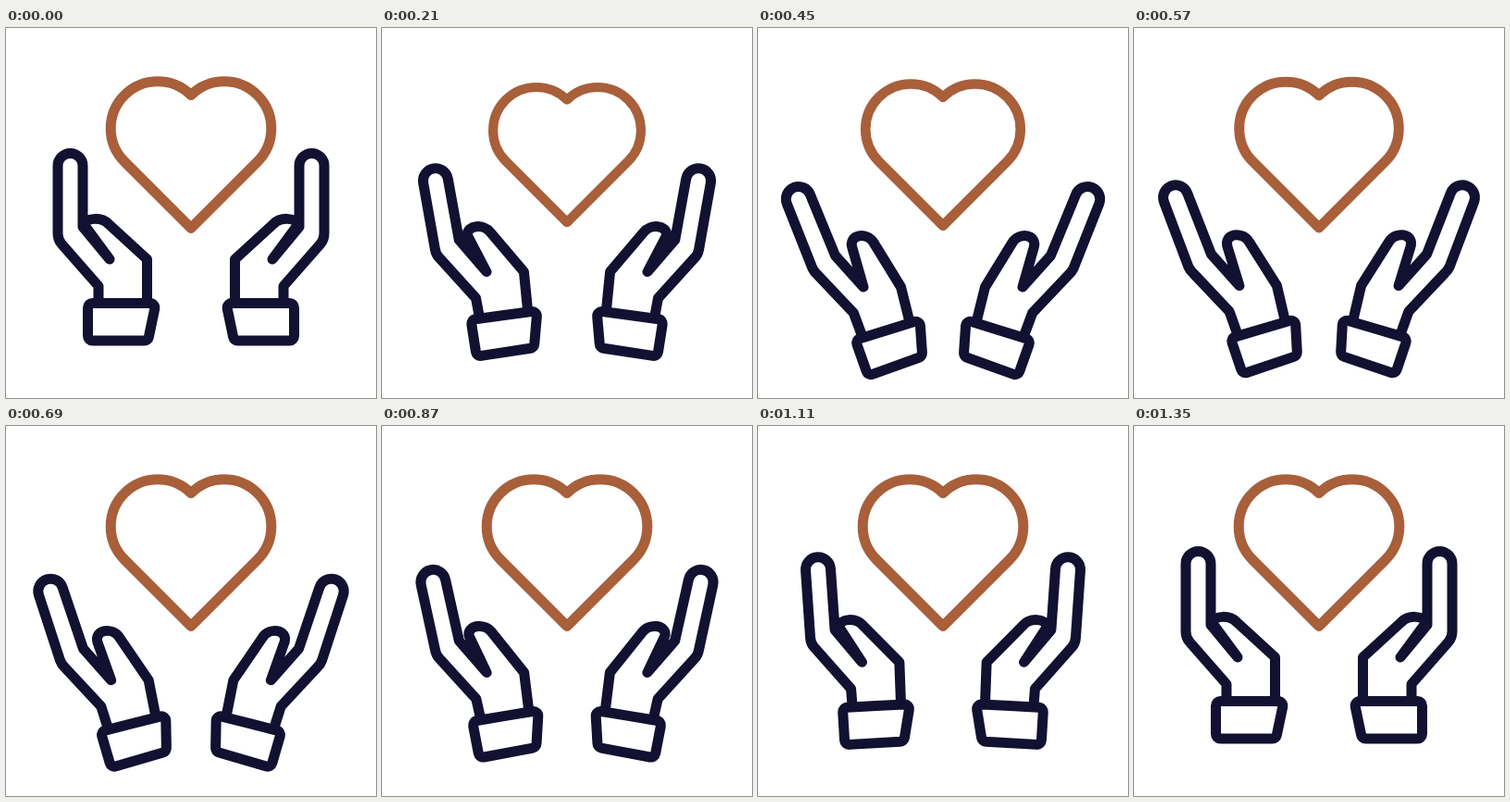
Animation of 400x400 px, one loop 1.91 s. Source, as an HTML page with a canvas:

```html
<!DOCTYPE html>
<html lang="en">
<head>
<meta charset="utf-8">
<title>Caring hands</title>
<style>
  html, body { margin: 0; width: 100%; height: 100%; overflow: hidden; background: #fff; }
  canvas { display: block; }
</style>
</head>
<body>
<canvas id="stage" width="400" height="400"></canvas>
<script>
const ctx = document.getElementById('stage').getContext('2d');
const LOOP = 1910, STEP = 30;
const NAVY = '#121131', COPPER = '#a85f3a';

// Left hand outline: [closed x, closed y, open x, open y]
const HAND = {
  wristLeft: [100, 297, 111.5, 330],
  heel: [100, 279, 103.3, 308],
  bendLow: [60, 233.3, 64, 266.5],
  bend: [56, 229, 61, 264],
  bendHigh: [56, 222, 59, 260],
  fingerLeft: [56, 149, 31, 190],
  fingerRight: [83, 149, 56.6, 180],
  fingerBase: [83, 215, 83.5, 246],
  web: [112, 250, 114, 280],
  thumbStart: [84, 212, 102, 238],
  thumbCurveA: [88, 205, 97, 223],
  thumbCurveB: [103, 204, 118, 220],
  thumbEnd: [111, 212, 125, 232],
  palm: [152.5, 250, 154.5, 280],
  wristRight: [152.5, 297, 164, 318]
};
const CUFF = [
  [88.5, 297.5, 105.2, 337.3],
  [162, 297.5, 175, 315.7],
  [153.5, 338, 177.7, 355],
  [88.5, 338, 119, 376]
];

const ease = (t, from, to) => {
  const u = Math.min(1, Math.max(0, (t - from) / (to - from)));
  return u * u * (3 - 2 * u);
};

function drawHand(open) {
  const mix = ([x, y, ox, oy]) => [x + (ox - x) * open, y + (oy - y) * open];
  const at = name => mix(HAND[name]);
  const line = (...names) => names.forEach(n => ctx.lineTo(...at(n)));

  ctx.beginPath();
  line('wristLeft', 'heel', 'bendLow');
  ctx.quadraticCurveTo(...at('bend'), ...at('bendHigh'));
  const [lx, ly] = at('fingerLeft'), [rx, ry] = at('fingerRight');
  const tilt = Math.atan2(ry - ly, rx - lx);
  ctx.arc((lx + rx) / 2, (ly + ry) / 2, 13.5, tilt + Math.PI, tilt + 2 * Math.PI);
  line('fingerBase', 'web', 'thumbStart');
  ctx.bezierCurveTo(...at('thumbCurveA'), ...at('thumbCurveB'), ...at('thumbEnd'));
  line('palm', 'wristRight');
  ctx.stroke();

  const corners = CUFF.map(mix);
  const [a, b] = corners;
  ctx.beginPath();
  ctx.moveTo((a[0] + b[0]) / 2, (a[1] + b[1]) / 2);
  for (let i = 1; i <= 4; i++) {
    ctx.arcTo(...corners[i % 4], ...corners[(i + 1) % 4], 5);
  }
  ctx.closePath();
  ctx.stroke();
}

const heart = new Path2D(
  'M200 216.4 L128.1 144.5 A50.8 50.8 0 0 1 200 72.6 A50.8 50.8 0 0 1 271.9 144.5Z');

function drawHeart(scale) {
  ctx.save();
  ctx.translate(200, 137);
  ctx.scale(scale, scale);
  ctx.translate(-200, -137);
  ctx.strokeStyle = COPPER;
  ctx.stroke(heart);
  ctx.restore();
}

function frame(now) {
  const t = Math.floor((now % LOOP) / STEP) * STEP;
  const open = ease(t, 0, 450) - ease(t, 450, 1350);
  const squeeze = ease(t, 0, 225) - ease(t, 225, 640);

  ctx.fillStyle = '#fff';
  ctx.fillRect(0, 0, 400, 400);
  ctx.lineWidth = 11;
  ctx.lineCap = ctx.lineJoin = 'round';
  drawHeart(1 - 0.08 * squeeze);

  ctx.strokeStyle = NAVY;
  drawHand(open);
  ctx.save();
  ctx.translate(400, 0);
  ctx.scale(-1, 1);
  drawHand(open);
  ctx.restore();
  requestAnimationFrame(frame);
}
frame(performance.now());
</script>
</body>
</html>
```
